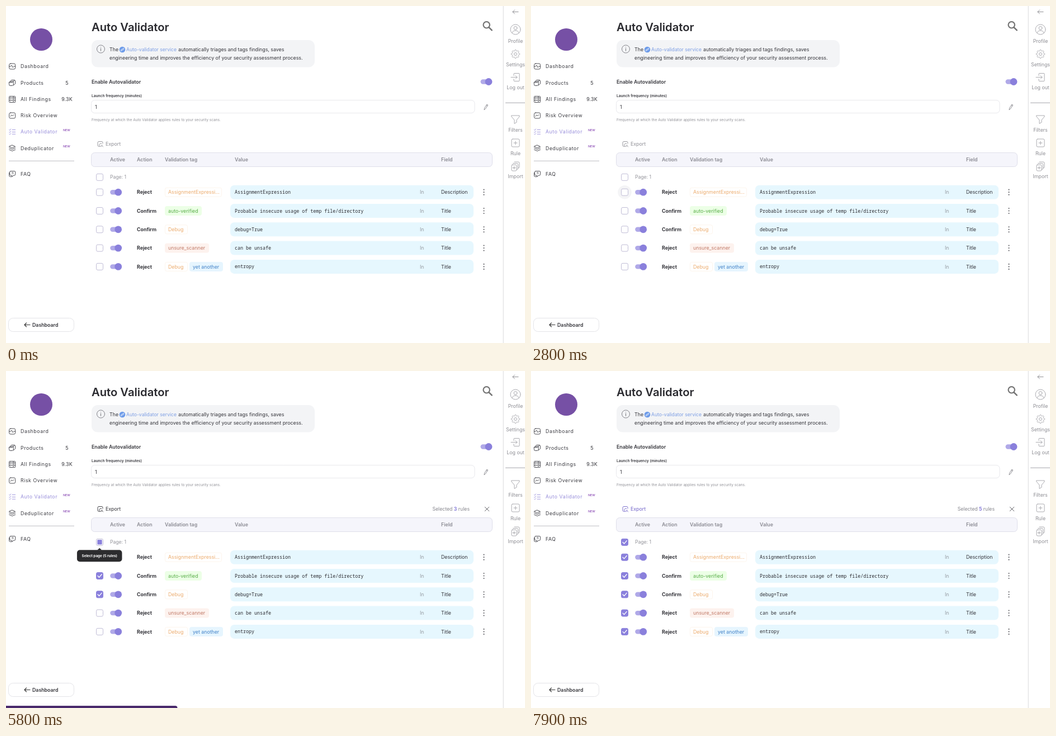
Animation, 928 px wide and 603 px high, one loop 8000 ms. Source, as an HTML page with a canvas:

```html
<!DOCTYPE html>
<html lang="en">
<head>
<meta charset="utf-8">
<title>Auto Validator</title>
<style>
html, body { margin: 0; width: 100%; height: 100%; overflow: hidden; background: #fff; }
canvas { display: block; width: 928px; height: 603px; }
</style>
</head>
<body>
<canvas id="stage"></canvas>
<script>
const W = 928, H = 603, LOOP = 8000, STEP = 100;
const canvas = document.getElementById('stage');
const ctx = canvas.getContext('2d');
const dpr = window.devicePixelRatio || 1;
canvas.width = W * dpr;
canvas.height = H * dpr;

const SANS = 'Inter, "Open Sans", sans-serif';
const MONO = '"Noto Sans Mono", "DejaVu Sans Mono", monospace';
const INK = '#35353b', GREY = '#a2a2a8', PURPLE = '#8a80dc', LILAC = '#b0a9e8';

// y is the middle of the capital letters
function text(str, x, y, { size = 8.8, weight = 400, color = INK, align = 'left', space = 0, family = SANS } = {}) {
  ctx.font = `${weight} ${size}px ${family}`;
  ctx.letterSpacing = space + 'px';
  ctx.textAlign = align;
  ctx.fillStyle = color;
  ctx.fillText(str, x, y + size * 0.364);
  return ctx.measureText(str).width;
}

function box(x, y, w, h, r, fill, stroke, line = 1) {
  ctx.beginPath();
  ctx.roundRect(x, y, w, h, r);
  if (fill) { ctx.fillStyle = fill; ctx.fill(); }
  if (stroke) { ctx.strokeStyle = stroke; ctx.lineWidth = line; ctx.stroke(); }
}

function disc(x, y, r, color) {
  ctx.beginPath();
  ctx.arc(x, y, r, 0, Math.PI * 2);
  ctx.fillStyle = color;
  ctx.fill();
}

// path drawn around the point x, y
function icon(d, x, y, color, line = 0.9) {
  ctx.save();
  ctx.translate(x, y);
  ctx.strokeStyle = color;
  ctx.lineWidth = line;
  ctx.lineCap = ctx.lineJoin = 'round';
  ctx.stroke(new Path2D(d));
  ctx.restore();
}

const FRAME = 'M-3-5H3Q5.5-5 5.5-2.5V2.5Q5.5 5 3 5H-3Q-5.5 5-5.5 2.5V-2.5Q-5.5-5-3-5Z';
const ICONS = {
  dashboard: FRAME + 'M-5.5 0H-3L-1-2L1 2L3 0H5.5',
  products: 'M-5.5-1L-3.5-2.5H2L2 3.5L.5 5H-4Q-5.5 5-5.5 3.5ZM-3.5-2.5L-1.5-5H4L5.5-3.5V1.5L2 4.5M-5.5-1H.5L2-2.5L4.5-5',
  findings: 'M-4.5-5.5H4.5Q5.5-5.5 5.5-4.5V-2.5H-5.5V-4.5Q-5.5-5.5-4.5-5.5M-5.5-2.5V1.5H5.5V-2.5M-5.5 1.5V4.5Q-5.5 5.5-4.5 5.5H4.5Q5.5 5.5 5.5 4.5V1.5M-3-4H-2.8M-3-.5H-2.8M-3 3.5H-2.8M1-4H3M1-.5H3M1 3.5H3',
  risk: FRAME + 'M-3 1.5L-1-1L1 .5L3-1.5',
  checks: 'M-5.5-3.5L-4.5-2.5L-2.5-5M-5.5.5L-4.5 1.5L-2.5-1M-5.5 4L-4.5 5L-2.5 3M0-3.5H5.5M0 .5H5.5M0 4.2H5.5',
  layers: 'M0-5.5L5.5-3L0-.5L-5.5-3ZM-5.5-.5L0 2L5.5-.5M-5.5 2.5L0 5L5.5 2.5',
  faq: 'M-3-5H4Q5.5-5 5.5-3.5V1Q5.5 2.5 4 2.5H2L0 5L-1 2.5H-3Q-4.5 2.5-4.5 1V-3.5Q-4.5-5-3-5M-5.5-2V3Q-5.5 5-3.5 5H-1M-1-2Q1-4 2-2Q2-1 .5 0',
  back: 'M5 0H-5M-1.5-3.5L-5 0L-1.5 3.5',
  profile: 'M9 0A9 9 0 1 1-9 0A9 9 0 1 1 9 0M3-2.5A3 3 0 1 1-3-2.5A3 3 0 1 1 3-2.5M-6 6Q-5 2 0 2Q5 2 6 6',
  logout: 'M-3-3V-6Q-3-7-2-7H6Q7-7 7-6V6Q7 7 6 7H-2Q-3 7-3 6V3M-8 0H3M0-3L3 0L0 3',
  filter: 'M-7-7H7V-5L2 1V5L-2 7.5V1L-7-5Z',
  rule: 'M-5-7H5Q7-7 7-5V5Q7 7 5 7H-5Q-7 7-7 5V-5Q-7-7-5-7M-3 0H3M0-3V3',
  import: 'M-2-8H5Q7-8 7-6V1Q7 3 5 3M-4.5-5.5H2.5Q4.5-5.5 4.5-3.5V3.5Q4.5 5.5 2.5 5.5M-6-3H0Q2-3 2-1V6Q2 8 0 8H-5Q-7 8-7 6V-1Q-7-3-5-3M-5 2.5H0M-2.5 0V5',
  export: 'M4.5-1V-2.5Q4.5-4.5 2.5-4.5H-2.5Q-4.5-4.5-4.5-2.5V2Q-4.5 4.5-2 4.5H-1M3.5 2A2.6 2.6 0 1 1 2.5-.5M2.5 2.5L5 5',
  pencil: 'M-3 5L-2.4 2L2-4.5L3.7-3.3L-.5 3.2ZM1-3L2.8-1.8',
  close: 'M-3.7-3.7L3.7 3.7M3.7-3.7L-3.7 3.7',
  tick: 'M-3.5 0L-1 2.7L3.7-2.7'
};

const MENU = [
  ['Dashboard', 'dashboard', 108],
  ['Products', 'products', 137.5, '5'],
  ['All Findings', 'findings', 167, '9.3K'],
  ['Risk Overview', 'risk', 196],
  ['Auto Validator', 'checks', 225, 'NEW'],
  ['Deduplicator', 'layers', 254.5, 'NEW'],
  ['FAQ', 'faq', 300.5]
];
const TOOLS = [
  ['Profile', 'profile', 42, 62.5], ['Settings', 'gear', 86, 104.5],
  ['Log out', 'logout', 127.5, 146], ['Filters', 'filter', 203, 222],
  ['Rule', 'rule', 245, 263.5], ['Import', 'import', 287, 305]
];
const TAGS = {
  orange: ['#fff', '#fdf5ec', '#ecab6c'],
  green: ['#ecffe6', '#ecffe6', '#58ad48'],
  red: ['#fdf2ee', '#fdf2ee', '#c17a68'],
  blue: ['#e6f5fe', '#e6f5fe', '#4282c8']
};
const ROWS = [
  ['Reject', [['AssignmentExpressi…', 102, 'orange']], 'AssignmentExpression', 'Description'],
  ['Confirm', [['auto-verified', 66, 'green']], 'Probable insecure usage of temp file/directory', 'Title'],
  ['Confirm', [['Debug', 41, 'orange']], 'debug=True', 'Title'],
  ['Reject', [['unsure_scanner', 79, 'red']], 'can be unsafe', 'Title'],
  ['Reject', [['Debug', 41, 'orange'], ['yet another', 60, 'blue']], 'entropy', 'Title']
];
const rowY = i => 333.2 + i * 33.3;
const PAGE_Y = 306.3;

// 0..1, reaching 1 on the step that starts at `end`
const ramp = (t, start, end) => Math.max(0, Math.min(1, (t - start + STEP) / (end - start + STEP)));
const pulse = (t, a, b, c, d) => ramp(t, a, b) - ramp(t, c, d);

function gear(x, y) {
  ctx.beginPath();
  for (let i = 0; i <= 96; i++) {
    const a = i / 96 * Math.PI * 2;
    const r = 6.7 + 0.9 * Math.tanh(3 * Math.cos(a * 8));
    ctx.lineTo(x + r * Math.cos(a), y + r * Math.sin(a));
  }
  ctx.closePath();
  ctx.moveTo(x + 2.5, y);
  ctx.arc(x, y, 2.5, 0, Math.PI * 2);
  ctx.strokeStyle = GREY;
  ctx.lineWidth = 0.9;
  ctx.stroke();
}

function toggle(x, y) {
  box(x - 14.5, y - 4.2, 18, 8.4, 4.2, LILAC);
  disc(x, y, 6.4, PURPLE);
}

function checkbox(y, state, halo) {
  if (halo > 0) disc(167.5, y, 12.2, `rgba(60,50,100,${0.11 * halo})`);
  const full = state === 'on';
  box(161.5, y - 6, 12, 12, 2.5, full ? PURPLE : '#fff', full ? PURPLE : '#c0bdd6');
  if (full) icon(ICONS.tick, 167.5, y, '#fff', 1.3);
  if (state === 'part') box(163.3, y - 4.2, 8.4, 8.4, 1, PURPLE);
}

function sidebar() {
  disc(63, 60, 20, '#7650a5');
  for (const [label, name, y, note] of MENU) {
    const color = name === 'checks' ? '#978dda' : '#3c3c42';
    icon(ICONS[name], 11.2, y, color);
    text(label, 26, y, { color, space: 0.55 });
    if (note === 'NEW') text(note, 102, y - 3, { size: 5.4, weight: 600, color: '#9860bd' });
    else if (note) text(note, 109, y, { align: 'center', space: 0.2 });
  }
  box(5, 276.7, 117, 1, 0, '#bdbdc2');
  box(4.5, 558.5, 117, 24, 8, '#fff', '#e4e4e8');
  icon(ICONS.back, 38, 570.5, '#333', 1.1);
  text('Dashboard', 47, 570.5, { weight: 600 });
}

function toolbar() {
  box(888.7, 0, 1, H, 0, '#d8d8db');
  icon(ICONS.back, 911, 10.5, '#85858b');
  for (const [label, name, iconY, y] of TOOLS) {
    if (name === 'gear') gear(911, iconY);
    else icon(ICONS[name], 911, iconY, GREY, 0.9);
    text(label, 911, y, { color: '#8e8e94', align: 'center' });
  }
  box(893, 172.8, 35, 1, 0, '#a5a5aa');
}

function heading() {
  text('Auto Validator', 153, 37.3, { size: 20.2, weight: 600, color: '#29292e' });
  ctx.beginPath();
  ctx.arc(859.2, 33.8, 5.7, 0, Math.PI * 2);
  ctx.strokeStyle = '#737373';
  ctx.lineWidth = 2.2;
  ctx.stroke();
  icon('M0 0L5 5', 863.7, 38.3, '#737373', 2.5);

  box(153, 61, 399, 48.5, 11, '#f3f4f6');
  ctx.beginPath();
  ctx.arc(169.5, 77, 7, 0, Math.PI * 2);
  ctx.strokeStyle = '#77777d';
  ctx.lineWidth = 0.9;
  ctx.stroke();
  icon('M0-1V3.3M0-3.4V-3.3', 169.5, 77, '#77777d', 1);
  text('The', 185, 78);
  disc(208, 78, 5.3, '#6d9be9');
  icon('M-.5 1.5L-1.5 2.5Q-3 2.5-2.8 1L-1-.8M.5-1.5L1.5-2.5Q3-2.5 2.8-1L1 .8M-1 1L1-1', 208, 78, '#fff', 0.8);
  text('Auto-validator service', 215, 78, { size: 8.6, color: '#7e9fe4' });
  text('automatically triages and tags findings, saves', 308, 78);
  text('engineering time and improves the efficiency of your security assessment process.', 185, 93);

  text('Enable Autovalidator', 153, 135.5, { weight: 600 });
  toggle(863, 135.5);
  text('Launch frequency (minutes)', 153, 160.3, { size: 6.6, weight: 600 });
  box(152.5, 168.5, 685.5, 23, 6, '#fff', '#e8e8ec');
  text('1', 159, 180.5);
  icon(ICONS.pencil, 858, 180.5, '#77777d', 0.8);
  text('Frequency at which the Auto Validator applies rules to your security scans.', 153, 204, { size: 6.55, color: '#929298' });
}

function mix(a, b, k) {
  return `rgb(${a.map((v, i) => Math.round(v + (b[i] - v) * k))})`;
}

function actions(t, count) {
  const base = count ? [48, 48, 54] : [142, 142, 149];
  const color = mix(base, [112, 98, 200], ramp(t, 7700, 7900));
  icon(ICONS.export, 168.5, 247, color);
  text('Export', 178, 247, { color });
  if (!count) return;
  let x = 829;
  const parts = [[count > 1 ? ' rules' : ' rule', '#85858c', 400], [String(count), PURPLE, 700], ['Selected ', '#85858c', 400]];
  for (const [str, tint, weight] of parts) {
    x -= text(str, x, 247, { color: tint, weight, align: 'right', size: 8.7 });
  }
  icon(ICONS.close, 860, 247, '#66666b', 1);
}

function table(t, count, halos) {
  box(152.5, 262.5, 717, 25, 6, '#f5f5fb', '#dfdfea');
  for (const [label, x] of [['Active', 186], ['Action', 234], ['Validation tag', 284], ['Value', 409], ['Field', 778]]) {
    text(label, x, 275, { weight: 600, color: '#8b8b93' });
  }
  checkbox(PAGE_Y, count === 5 ? 'on' : count ? 'part' : 'off', halos.page);
  text('Page: 1', 186, PAGE_Y, { color: '#94949b', size: 8.6 });

  ROWS.forEach(([action, tags, value, field], i) => {
    const y = rowY(i);
    checkbox(y, i < count ? 'on' : 'off', halos.rows[i] || 0);
    toggle(200.7, y);
    text(action, 234, y, { weight: 700 });
    let x = 284;
    for (const [label, w, kind] of tags) {
      const [fill, edge, color] = TAGS[kind];
      box(x + 0.5, y - 8, w - 1, 16, 3, fill, edge);
      text(label, x + 6, y, { color });
      x += w + 3;
    }
    box(401, y - 12.5, 435, 25, 7, '#e6f7fe');
    text(value, 409, y, { family: MONO, size: 8.35, weight: 500, color: '#2b2b30' });
    text('In', 740, y, { color: '#94999f' });
    text(field, 778, y);
    for (const dy of [-4.5, 0, 4.5]) disc(854.5, y + dy, 1.1, '#66666b');
  });
}

function tooltip(label, w, alpha) {
  if (alpha <= 0) return;
  const scale = 0.85 + 0.15 * alpha;
  ctx.save();
  ctx.globalAlpha = alpha;
  ctx.translate(167.2, 317);
  ctx.scale(scale, scale);
  box(-w / 2, 3.3, w, 21, 5, '#2c2c2e');
  ctx.beginPath();
  ctx.moveTo(-4, 3.6);
  ctx.lineTo(0, -0.3);
  ctx.lineTo(4, 3.6);
  ctx.fill();
  text(label, 0, 13.6, { size: 6.3, weight: 700, color: '#fff', align: 'center' });
  ctx.restore();
}

function draw(time) {
  const t = Math.floor(time / STEP) * STEP;
  const count = t >= 6500 ? 5 : [3100, 4200, 4800].filter(click => t >= click).length;
  const halos = {
    page: pulse(t, 5500, 5600, 5700, 5800) + pulse(t, 6200, 6300, 7000, 7100),
    rows: [
      pulse(t, 2800, 2900, 3800, 3900),
      pulse(t, 3900, 4000, 4400, 4500),
      pulse(t, 4500, 4600, 5100, 5200)
    ]
  };
  const tip = pulse(t, 700, 1000, 2200, 2400) + pulse(t, 5300, 5600, 6000, 6100) + pulse(t, 6200, 6300, 7600, 7700);

  ctx.setTransform(dpr, 0, 0, dpr, 0, 0);
  ctx.fillStyle = '#fff';
  ctx.fillRect(0, 0, W, H);
  sidebar();
  toolbar();
  heading();
  actions(t, count);
  table(t, count, halos);
  if (count === 5) tooltip('Unselect page (5 rules)', 89, tip);
  else tooltip('Select page (5 rules)', 80.5, tip);
  if (count && count < 5) box(0, H - 4 * ramp(t, 3100, 3300), 306.5, 6, [0, 4, 0, 0], '#4a2a6c');
}

const begin = performance.now();
function tick() {
  draw((performance.now() - begin) % LOOP);
  requestAnimationFrame(tick);
}
tick();
</script>
</body>
</html>
```
